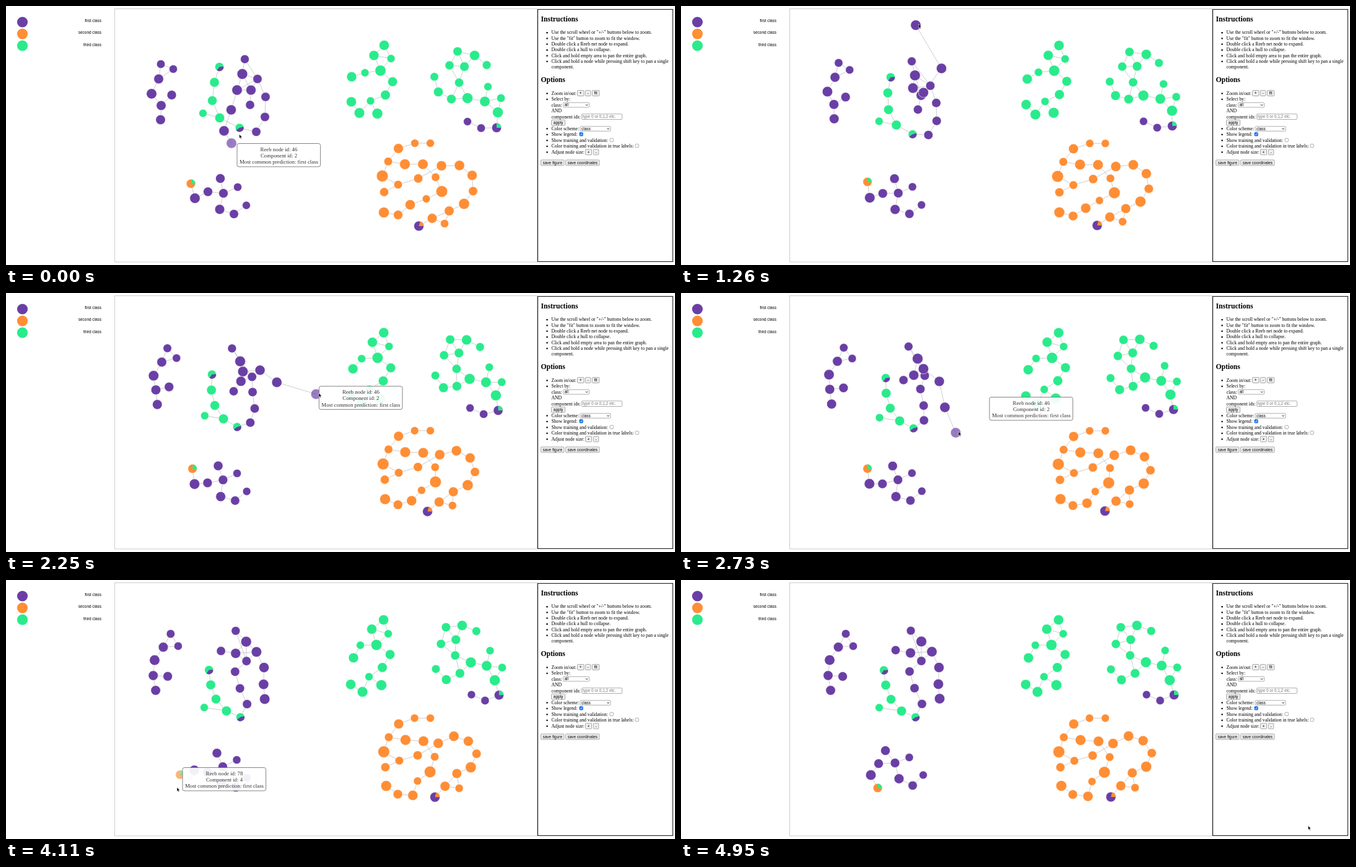
These frames come from a looping animation (1080 by 419 pixels, 5.43 s). An HTML page:

```html
<!DOCTYPE html>
<html lang="en">
<head>
<meta charset="utf-8">
<title>Reeb net explorer</title>
<style>
  html, body { margin: 0; height: 100%; overflow: hidden; background: #fff; }
  svg { display: block; width: 100vw; height: 100vh; }
  .serif { font: 7.7px "Liberation Serif", serif; }
  .sans { font: 6.45px "Liberation Sans", sans-serif; }
  .head { font: bold 11.6px "Liberation Serif", serif; }
  #tip { font: 8.8px "Liberation Serif", serif; fill: #333; text-anchor: middle; }
</style>
</head>
<body>
<svg viewBox="0 0 1080 419">
  <rect x="175.5" y="4.5" width="682" height="409.5" fill="none" stroke="#ccc"/>
  <rect x="858.5" y="5.5" width="218" height="408" fill="none" stroke="#222" stroke-width="1.1"/>
  <g id="panel"></g>
  <g id="edges" stroke="#aaa" stroke-width=".6"></g>
  <g id="nodes"></g>
  <g id="tip">
    <rect width="134.6" height="37.5" rx="3" fill="#fff" fill-opacity=".92" stroke="#777" stroke-width=".9"/>
    <text x="67.5" y="12"></text>
    <text x="67.5" y="22.4"></text>
    <text x="67.5" y="32.8">Most common prediction: first class</text>
  </g>
  <path id="cursor" d="M0 0V6.6L1.5 5.3 2.6 7.7 3.7 7.2 2.6 4.9H4.6Z" stroke="#fff" stroke-width=".5"/>
</svg>
<script>
const PURPLE = '#6a3fa5', ORANGE = '#ff8e35', GREEN = '#2aeb8c';
const LOOP = 5430, STEP = 30, BEGIN = 480, END = 4950;
const $ = id => document.getElementById(id);

function set(el, attrs) {
  for (const k in attrs) el.setAttribute(k, attrs[k]);
}
function make(parent, tag, attrs, text) {
  const el = document.createElementNS('http://www.w3.org/2000/svg', tag);
  set(el, attrs);
  if (text) el.textContent = text;
  return parent.appendChild(el);
}

// Graphs relax with a soft start and a long settling; a higher power settles sooner
const settle = (k, power) => 1 - (1 - k ** 1.3) ** power;

// Position on a track of [time, x, y, power]; without a power the move is linear
function place(track, t) {
  const i = track.findIndex(p => p[0] > t);
  if (i < 0) return track[track.length - 1].slice(1, 3);
  if (i === 0) return track[0].slice(1, 3);
  const [t0, x0, y0] = track[i - 1], [t1, x1, y1, power] = track[i];
  let k = (t - t0) / (t1 - t0);
  if (power) k = settle(k, power);
  return [x0 + (x1 - x0) * k, y0 + (y1 - y0) * k];
}

// ---- Side panel and legend ----
const panel = $('panel');
const write = (x, y, text, cls = 'serif', more = {}) =>
  make(panel, 'text', { x, y, class: cls, ...more }, text);
const bullet = y => make(panel, 'circle', { cx: 873.5, cy: y - 2.2, r: 1.25 });
const box = (x, y, width, height, fill = '#fff', stroke = '#777') =>
  make(panel, 'rect', { x, y, width, height, rx: 1.2, fill, stroke, 'stroke-width': .6 });
const tick = (d, stroke) => make(panel, 'path', { d, fill: 'none', stroke, 'stroke-width': .9 });
function button(x, y, w, text) {
  box(x, y, w, 9, '#efefef');
  write(x + w / 2, y + 6.8, text, 'sans', { 'text-anchor': 'middle' });
}
function select(x, y, w, text) {
  box(x, y, w, 7.6);
  write(x + 2, y + 5.8, text, 'sans');
  tick(`M${x + w - 5.5} ${y + 3}l1.6 1.8 1.6-1.8`, '#000');
}

[[PURPLE, 'first class'], [ORANGE, 'second class'], [GREEN, 'third class']].forEach(([fill, text], i) => {
  make(panel, 'circle', { cx: 26.5, cy: 26 + 19.1 * i, r: 8.6, fill });
  write(154, 26 + 19.3 * i, text, 'sans', { 'text-anchor': 'end' });
});

write(863.5, 25.4, 'Instructions', 'head');
['Use the scroll wheel or "+/-" buttons below to zoom.',
 'Use the "fit" button to zoom to fit the window.',
 'Double click a Reeb net node to expand.',
 'Double click a hull to collapse.',
 'Click and hold empty area to pan the entire graph.',
 'Click and hold a node while pressing shift key to pan a single',
 'component.'].forEach((line, i) => {
  const y = 45.4 + 9.33 * i;
  write(880.5, y, line);
  if (i < 6) bullet(y);
});

write(863.5, 123.4, 'Options', 'head');
['Zoom in/out:', 'Select by:', 'class:', 'AND', 'component ids:', '', 'Color scheme:', 'Show legend:',
 'Show training and validation:', 'Color training and validation in true labels:',
 'Adjust node size:'].forEach((line, i) => {
  const y = 143.6 + 9.5 * i;
  write(880.5, y, line);
  if (i < 2 || i > 5) bullet(y);
});
button(922.5, 136.5, 10.5, '+');
button(935.3, 136.5, 8.5, '-');
button(946.3, 136.5, 11.5, 'fit');
select(899.5, 156.3, 42, 'all');
box(929.5, 174.7, 65, 8.8);
write(931, 181.3, 'type 0 or 0,1,2 etc.', 'sans', { fill: '#777' });
button(880.5, 184.2, 22, 'apply');
select(927, 194.8, 49, 'class');
box(925.8, 204.6, 5.6, 5.6, '#1a73e8', '#1a73e8');
tick('M927 207.5l1.2 1.3 2.1-2.9', '#fff');
box(975, 214.2, 5.4, 5.4);
box(1016, 223.4, 5.4, 5.4);
button(935.5, 231.8, 10, '+');
button(948.3, 231.8, 8.5, '-');
button(863.5, 249, 37.5, 'save figure');
button(903.5, 249, 54.5, 'save coordinates');

// ---- Graph components: nodes are lettered a, b, c ... ----
const graphs = [];

class Graph {
  constructor(color, radii, edges, special = {}) {
    this.nodes = radii.map((r, i) => {
      const { fill = color, wedge } = special[String.fromCharCode(97 + i)] || {};
      const el = make($('nodes'), 'g', {});
      make(el, 'circle', { r: r + .3, fill, stroke: '#fff', 'stroke-width': .6 });
      if (wedge) {
        const [tint, from, to] = wedge;
        const rim = deg => [Math.cos(deg * Math.PI / 180) * r, Math.sin(deg * Math.PI / 180) * r];
        make(el, 'path', { d: `M0 0L${rim(from)}A${r} ${r} 0 0 1 ${rim(to)}Z`, fill: tint });
      }
      return { el, track: [] };
    });
    this.edges = edges.split(' ').map(([a, b]) => ({
      a: this.node(a), b: this.node(b), el: make($('edges'), 'line', {})
    }));
    graphs.push(this);
  }
  node(letter) { return this.nodes[letter.charCodeAt(0) - 97]; }
  pose(t, power, xy) {
    this.nodes.forEach((n, i) => n.track.push([t, xy[2 * i], xy[2 * i + 1], power]));
    return this;
  }
  via(letter, ...points) {
    const { track } = this.node(letter);
    track.push(...points);
    track.sort((p, q) => p[0] - q[0]);
    return this;
  }
  draw(t) {
    for (const n of this.nodes) {
      n.at = place(n.track, t);
      set(n.el, { transform: `translate(${n.at})`, opacity: 1 });
    }
    for (const { a, b, el } of this.edges)
      set(el, { x1: a.at[0], y1: a.at[1], x2: b.at[0], y2: b.at[1] });
  }
}

new Graph(PURPLE, [6.5, 6.3, 7.5, 8, 7.5, 7.2, 7.5], 'ab ac bc cd de ef eg')
  .pose(BEGIN, 0, [250,94, 270,102, 246.5,118, 235,142, 250.5,161, 267.5,144, 249.5,184])
  .pose(END, 3, [266,87, 278,107, 254,108.5, 240,129.5, 237.5,154.5, 261,156, 241.5,178.5]);

// Where the mouse carries the loose end of the tall component
const drag = [[660, 366, 220], [840, 415, 175], [1020, 428, 95], [1260, 379, 31],
  [1380, 390, 36], [1830, 521.5, 115], [2400, 493, 181], [2730, 443.5, 226]];

const green = { fill: GREEN };
const tall = new Graph(PURPLE, [6.7, 8.2, 7, 8, 7.7, 6.9, 7, 7, 7, 7.8, 7.9, 8, 6.6, 7.5, 6.2, 7.3, 7.4, 6.8],
  'ab ac bc bd be cd de ce ef cg gh hi im mn no np pq qr dj jk kl', {
    m: { fill: GREEN, wedge: [PURPLE, -15, 145] }, n: green, o: green, p: green, q: green,
    r: { fill: GREEN, wedge: [PURPLE, -5, 125] }
  })
  .pose(BEGIN, 0, [385.5,86, 381.5,110, 406,118, 373,136, 395.5,136, 394,160, 419,147, 418,179.5, 404,203.5,
    363.5,168, 352,202, 364,222, 377,197, 345,181, 318,173.5, 333,153, 336.5,123.5, 344.5,98.5])
  .pose(1830, 0, [363,92, 375,114, 400,137, 375.5,130.5, 382,150.5, 374,173, 407,164, 409,190.5, 396,212.5,
    404,109, 447,109, 521,115, 371.5,215, 349.5,201, 321,196, 336.5,178.5, 332,153, 334,127.5])
  .pose(END, 3.5, [371,82, 388,99.5, 388,131, 405,116, 370.5,118, 346.5,113.5, 369,148, 377,175, 389,200.5,
    416.5,141.5, 415.5,168.5, 417.5,192, 378.5,222, 356,212, 320,206.5, 339,193, 330.5,170, 327.5,146])
  .via('j', [1260, 391.5, 140], [2730, 417, 143])
  .via('k', [1260, 420.5, 101], [2730, 426, 185], [3240, 418, 170.5])
  .via('l', ...drag, [3240, 418.5, 196]);

new Graph(GREEN, [7.8, 7.7, 6.2, 8.5, 6.2, 7.7, 7.4, 7.5, 6.2, 7.8, 8.1, 8.3],
  'ab ac bc bd cd de ef dg gh hi ik il jk')
  .pose(BEGIN, 0, [610.5,63.5, 594,80, 621.5,85, 604.5,104.5, 579.5,108, 558,114.5, 624,122.5, 612.5,144,
    588.5,153.5, 557.5,155, 570.5,173, 599.5,174])
  .pose(END, 3.5, [609.5,64.5, 590.5,79.5, 617,87, 598,105, 572,105.5, 561,126, 620,120.5, 607.5,141.5,
    586,156.5, 556.5,169, 575.5,181, 606,170]);

new Graph(GREEN, [7, 6.9, 7.8, 7.2, 6.6, 6.9, 6.5, 7.4, 7.2, 8.3, 8, 6.2, 6.4, 8.3, 7.4, 6.4, 6.2],
  'ab ac ad bd cd ce bf df fi fj gh hi ij jk kl km kn mn no op pq', {
    o: { fill: PURPLE, wedge: [GREEN, -90, 0] }, p: { fill: PURPLE }, q: { fill: PURPLE }
  })
  .pose(BEGIN, 0, [729,73.5, 716,96, 756.5,80, 740,98, 776,95.5, 731.5,124, 691.5,114.5, 698,139, 719,150.5,
    745,149, 773,154.5, 778,130.5, 799,149, 794,172, 792,197, 767,197.5, 745,187])
  .pose(END, 2.8, [710,76.5, 702,103.5, 736,73.5, 726,96.5, 759,82.5, 725,122, 694,144.5, 711,161.5, 733,151,
    750.5,133, 776,138.5, 781.5,114, 801,141.5, 789,162, 796,186, 773.5,195, 751.5,185.5]);

new Graph(ORANGE, [6.2, 6.2, 7.6, 6.5, 8.2, 8, 7.8, 7.9, 7.7, 7, 8.4, 7.5, 6.3, 7.6, 7.7, 9.1, 6.5, 6.9, 7, 6.4, 9, 6.1, 7.8, 7.2, 8.3],
  'ab bc cd de dp ef ft gs gh hi ij jk kl lm ln mn no pq qr qs tu uv vw wx xy', {
    o: { fill: PURPLE, wedge: [ORANGE, -75, 0] }
  })
  .pose(BEGIN, 0, [685,222, 660,222, 633.5,230.5, 617,251.5, 644,256, 673,256, 703,258.5, 732,258, 752.5,274,
    754,299.5, 739.5,320, 715.5,331.5, 708,352, 688,343.5, 666.5,356, 607.5,275, 633,289, 610.5,301, 665.5,279,
    693.5,277, 703.5,300, 678.5,312, 652.5,321.5, 633,338, 610,334])
  .pose(END, 2, [685,223.5, 659.5,223.5, 634,233, 618,254.5, 645,259, 674,261, 697.5,264.5, 722.5,252.5, 746,260,
    760,280, 751,302, 728.5,312, 733,336, 710,333, 694,351, 610,278, 635,292.5, 612.5,303, 664.5,284,
    692,286.5, 683.5,311, 663.5,326, 657,350, 632.5,347, 614,333]);

const low = new Graph(PURPLE, [7.3, 6.3, 7.2, 7.2, 8, 7, 7.6, 7, 6.2], 'ac bc cd de ef cg gh hi', {
    f: { fill: ORANGE, wedge: [GREEN, -85, 10] }
  })
  .pose(BEGIN, 0, [346,279, 374,293, 351,303, 326,300.5, 305,311, 298.5,287.5, 345,329, 368,336.5, 388,322.5])
  .pose(4110, 2, [340.5,280, 372.5,291, 350,302, 325,311, 304,308, 281,315, 347.5,329.5, 371,335.5, 389,320])
  .pose(END, 0, [330,276, 368.5,287, 345.5,296, 319,297, 306.5,315.5, 317.5,336.5, 352,321.5, 374,332.5, 391,315.5])
  .via('f', [1260, 301, 284.5], [3540, 301, 284], [4260, 284, 337]);

// ---- Hover states and pointer ----
const tips = [
  { from: 0, to: 690, id: 46, part: 2, node: tall.node('l'), track: [[0, 373, 222.5]] },
  { from: 1740, to: 2820, id: 46, part: 2, node: tall.node('l'), track: [[1740, 504, 85], [1830, 526, 101.5], [2400, 498, 168.5]] },
  { from: 3090, to: 3390, id: 87, part: 4, node: low.node('b'), track: [[0, 377, 279]] },
  { from: 3420, to: 4260, id: 78, part: 4, node: low.node('f'), track: [[3540, 305, 273], [4110, 285, 303.5], [4260, 288, 326]] }
];
const pointer = [[BEGIN, 376.6, 207.4], ...drag.map(([t, x, y]) => [t, x + 4.5, y - 1.8]),
  [3060, 374, 289], [3240, 325, 286.5], [3480, 302, 284], [4110, 276, 335.4],
  [4260, 330, 365], [4440, 700, 384], [4740, 1012.4, 397.4]];

function draw(t) {
  graphs.forEach(g => g.draw(t));
  const tip = tips.find(p => t >= p.from && t < p.to);
  set($('tip'), { visibility: tip ? 'visible' : 'hidden' });
  if (tip) {
    set(tip.node.el, { opacity: .68 });
    set($('tip'), { transform: `translate(${place(tip.track, t)})` });
    const [first, second] = $('tip').querySelectorAll('text');
    first.textContent = `Reeb node id: ${tip.id}`;
    second.textContent = `Component id: ${tip.part}`;
  }
  set($('cursor'), { transform: `translate(${place(pointer, t)})` });
}

const start = performance.now();
function run() {
  const t = (performance.now() - start) % LOOP;
  draw(Math.floor(t / STEP) * STEP);
  requestAnimationFrame(run);
}
run();
</script>
</body>
</html>
```
